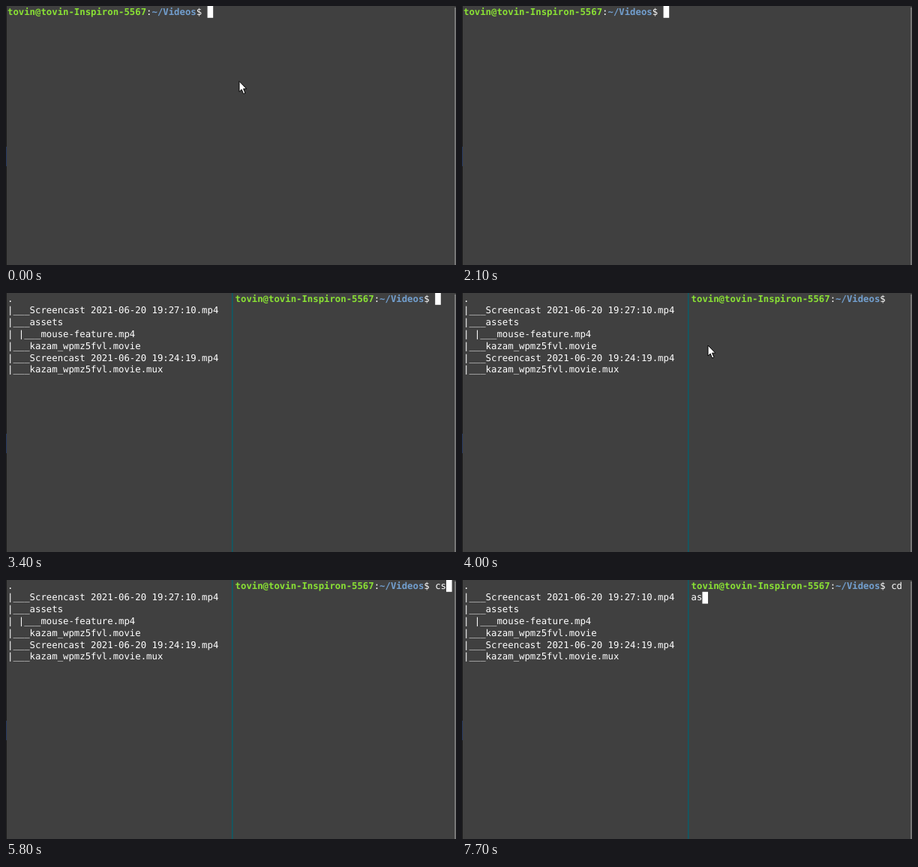
An HTML page for the animation above (8000 ms loop, 600 by 346 pixels).

```html
<!DOCTYPE html>
<html lang="en">
<head>
<meta charset="utf-8">
<title>Split terminal</title>
<style>
  html, body { margin: 0; width: 100%; height: 100%; overflow: hidden; background: #404040; }
  svg { display: block; width: 600px; height: 346px; }
  text {
    font: 12.3px "DejaVu Sans Mono", monospace;
    fill: #fff;
    white-space: pre;
    text-rendering: geometricPrecision;
  }
  .user { fill: #8ae234; font-weight: bold; }
  .path { fill: #729fcf; font-weight: bold; }
</style>
</head>
<body>
<svg viewBox="0 0 600 346">
  <rect width="600" height="346" fill="#404040"/>
  <rect width="1" height="346" fill="#1c1c1c"/>
  <rect y="188" width="1" height="26" fill="#24375f"/>
  <rect x="598" y="2" width="2" height="344" fill="#777"/>
  <g id="tree">
    <rect x="301" width="1.5" height="346" fill="#0b5c69"/>
  </g>
  <g id="shell">
    <text id="prompt" y="11.5"><tspan class="user">tovin@tovin-Inspiron-5567</tspan>:<tspan class="path">~/Videos</tspan>$ </text>
    <text id="typed" y="11.5"></text>
    <text id="wrapped" y="27.3"></text>
    <rect id="caret" width="7.6" height="15.8" fill="#fff"/>
  </g>
  <path id="mouse" d="M0 0V14L3.2 11L5.6 16.9L8 15.9L5.6 10.2H9.8Z" fill="#fff" stroke="#000" stroke-width="1"/>
</svg>
<script>
const LOOP = 8000, CELL = 7.405, ROW = 15.8, LEFT = 2;
const PROMPT = 36, COLS = 39, SPLIT_AT = 3400;
const $ = id => document.getElementById(id);

const files = [
  '.',
  '|___Screencast 2021-06-20 19:27:10.mp4',
  '|___assets',
  '| |___mouse-feature.mp4',
  '|___kazam_wpmz5fvl.movie',
  '|___Screencast 2021-06-20 19:24:19.mp4',
  '|___kazam_wpmz5fvl.movie.mux'
];
files.forEach((name, i) => {
  const line = document.createElementNS('http://www.w3.org/2000/svg', 'text');
  line.setAttribute('x', LEFT);
  line.setAttribute('y', 11.5 + i * ROW);
  line.textContent = name;
  $('tree').append(line);
});

// Each track is a list of [start time, value].
const input = [
  [0, ''], [5700, 'c'], [5800, 'cs'], [6700, 'c'], [6900, ''],
  [7100, 'c'], [7200, 'cd'], [7400, 'cd '], [7600, 'cd a'], [7700, 'cd as']
];
const blink = [
  [0, 1], [600, 0], [1200, 1], [1800, 0], [2100, 1], [3000, 0], [3300, 1],
  [4000, 0], [4600, 1], [5100, 0], [5700, 1], [6400, 0], [6700, 1]
];
const pointer = [
  [0, [311, 100.5]], [1500, null], [2300, [311, 100.5]], [3300, null],
  [3900, [315, 90]], [4000, [328, 70]], [4100, [339.5, 52.5]],
  [4500, [343.5, 53]], [5700, null]
];

const at = (track, t) => track.findLast(step => step[0] <= t)[1];
const show = (el, on) => el.setAttribute('visibility', on ? 'visible' : 'hidden');

function draw(t) {
  const split = t >= SPLIT_AT;
  const x = LEFT + (split ? 41 * CELL : 0);
  const text = at(input, t);
  const room = COLS - PROMPT;
  const pos = PROMPT + text.length;

  show($('tree'), split);
  $('prompt').setAttribute('x', x);
  $('typed').setAttribute('x', x + PROMPT * CELL);
  $('typed').textContent = text.slice(0, room);
  $('wrapped').setAttribute('x', x);
  $('wrapped').textContent = text.slice(room);

  $('caret').setAttribute('x', x + (pos % COLS) * CELL);
  $('caret').setAttribute('y', Math.floor(pos / COLS) * ROW);
  show($('caret'), at(blink, t));

  const spot = at(pointer, t);
  show($('mouse'), spot);
  if (spot) $('mouse').setAttribute('transform', `translate(${spot})`);
}

const start = performance.now();
function tick() {
  draw((performance.now() - start) % LOOP);
  requestAnimationFrame(tick);
}
tick();
</script>
</body>
</html>
```
